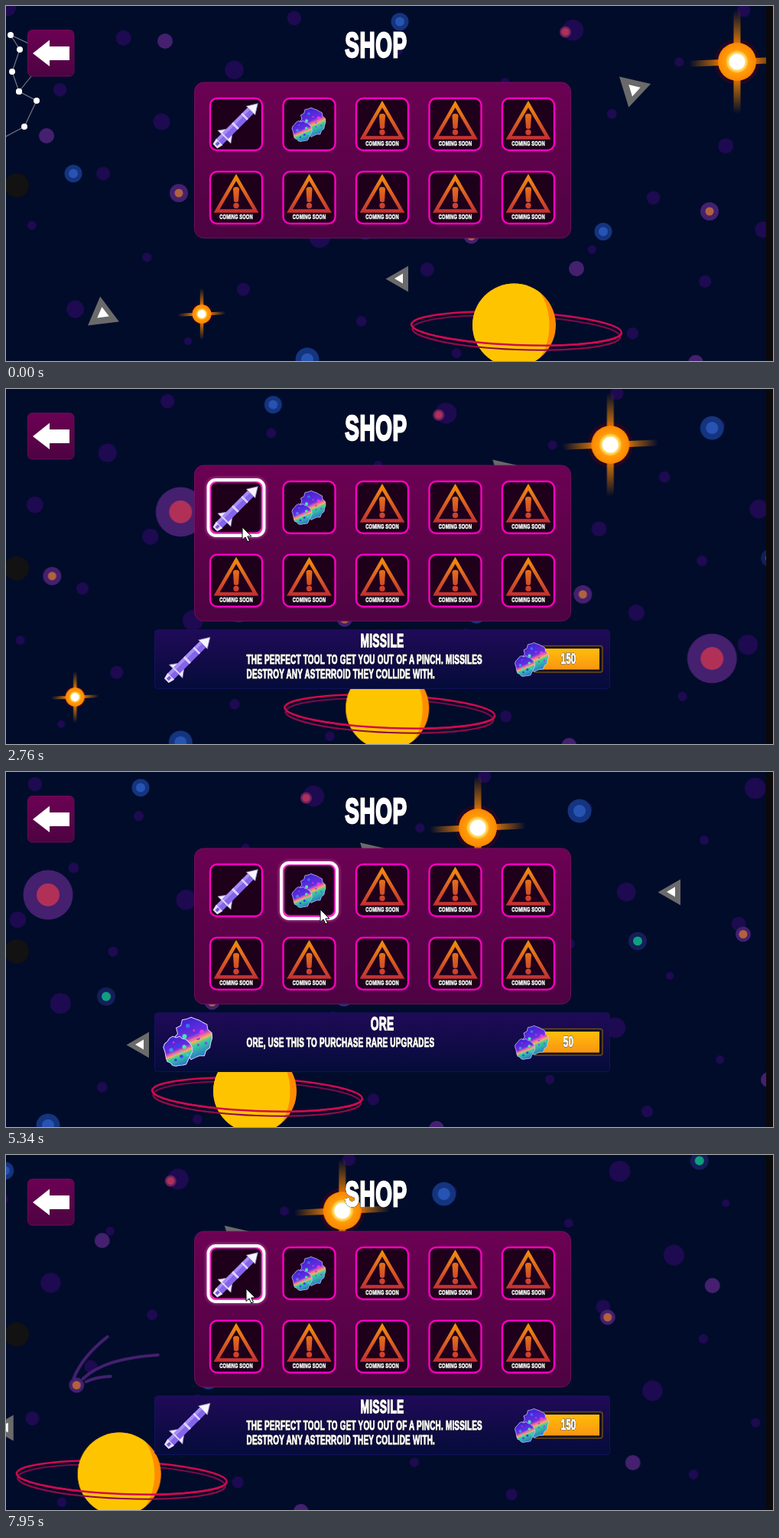
Write an HTML page that moves like this. It is 1003 px wide and 465 px high and loops after 8 s.

```html
<!DOCTYPE html>
<html lang="en">
<head>
<meta charset="utf-8">
<title>Shop</title>
<style>
html, body { margin: 0; width: 100%; height: 100%; overflow: hidden; background: #0b0909; }
svg { display: block; width: 1003px; height: 465px; }
text { font-family: "Liberation Sans", Arial, sans-serif; font-weight: 700; letter-spacing: .02em;
  fill: #fff; stroke: #fff; stroke-width: .06em; filter: drop-shadow(0 0 .7px #000) drop-shadow(0 0 .7px #000); }
#sky { animation: drift 8s infinite; }
#pointer { animation: point 8s linear infinite; }
.missile { animation: missile 8s step-end infinite; }
.ore { animation: ore 8s step-end infinite; }

@keyframes drift {
  0% { transform: translateX(0); animation-timing-function: steps(12); }
  10.25% { transform: translateX(-51.5px); animation-timing-function: steps(17); }
  24.875% { transform: translateX(-115px); animation-timing-function: steps(23); }
  45% { transform: translateX(-221px); animation-timing-function: steps(25); }
  66.75% { transform: translateX(-339px); animation-timing-function: steps(23); }
  86.625% { transform: translateX(-444.5px); animation-timing-function: steps(15); }
  99.375%, 100% { transform: translateX(-516.3px); }
}
@keyframes point {
  0% { transform: translate(372px, 296px); opacity: 0; animation-timing-function: step-end; }
  18% { transform: translate(372px, 296px); opacity: 1; animation-timing-function: ease-out; }
  24%, 41.5% { transform: translate(309px, 181px); opacity: 1; }
  50%, 74% { transform: translate(411px, 180px); opacity: 1; }
  83%, 87.5% { transform: translate(309px, 173px); opacity: 1; }
  92%, 100% { transform: translate(314px, 175px); opacity: 1; }
}
@keyframes missile {
  0% { opacity: 0; } 31.25% { opacity: 1; } 53.75% { opacity: 0; } 91.25%, 100% { opacity: 1; }
}
@keyframes ore {
  0% { opacity: 0; } 53.75% { opacity: 1; } 91.25%, 100% { opacity: 0; }
}
</style>
</head>
<body>
<svg viewBox="0 0 1003 465">
  <defs>
    <linearGradient id="plum" x2="0" y2="1"><stop stop-color="#6c0153"/><stop offset="1" stop-color="#4d0342"/></linearGradient>
    <linearGradient id="indigo" x2="0" y2="1"><stop stop-color="#200a58"/><stop offset="1" stop-color="#040c39"/></linearGradient>
    <linearGradient id="gold" x2="0" y2="1"><stop stop-color="#ffbd0a"/><stop offset="1" stop-color="#f99512"/></linearGradient>
    <linearGradient id="alert" gradientUnits="userSpaceOnUse" x1="0" y1="-30" x2="0" y2="20"><stop stop-color="#f58f0c"/><stop offset="1" stop-color="#c22f33"/></linearGradient>
    <linearGradient id="gem" x1=".3" x2=".7" y2="1">
      <stop stop-color="#3a22d2"/><stop offset=".42" stop-color="#6a2ee0"/><stop offset=".52" stop-color="#e8689c"/>
      <stop offset=".58" stop-color="#f0b45c"/><stop offset=".66" stop-color="#35cfa0"/><stop offset="1" stop-color="#2b62d0"/>
    </linearGradient>
    <linearGradient id="ray"><stop stop-color="#ff8a00" stop-opacity="0"/><stop offset=".3" stop-color="#ff8a00" stop-opacity=".75"/><stop offset=".5" stop-color="#ff9a00"/><stop offset=".7" stop-color="#ff8a00" stop-opacity=".75"/><stop offset="1" stop-color="#ff8a00" stop-opacity="0"/></linearGradient>
    <radialGradient id="sun"><stop offset=".4" stop-color="#fff"/><stop offset=".43" stop-color="#ffe37a"/><stop offset=".54" stop-color="#ffc23a"/><stop offset=".6" stop-color="#ff9d0a"/><stop offset="1" stop-color="#ff8500"/></radialGradient>
    <clipPath id="view"><path d="M0 0h994v465H0z"/></clipPath>
    <clipPath id="disc"><circle cx="664.5" cy="418" r="54.5"/></clipPath>
    <filter id="glow" x="-20%" y="-20%" width="140%" height="140%"><feGaussianBlur stdDeviation="2"/></filter>
    <marker id="node" markerUnits="userSpaceOnUse" markerWidth="8" markerHeight="8" refX="4" refY="4"><circle cx="4" cy="4" r="4" fill="#fff"/></marker>

    <g id="star">
      <circle r="30" fill="#220722"/>
      <path d="M-63 -4h126v8h-126z" fill="url(#ray)" transform="rotate(-2.5)"/>
      <path d="M-68 -4.5h136v9h-136z" fill="url(#ray)" transform="rotate(90)"/>
      <circle r="25" fill="url(#sun)"/>
    </g>
    <g id="shard">
      <path d="M-19.500 0L10 -17V17z" fill="#6a6a6a"/><path d="M-8 -.5L3 -7V6z" fill="#fff"/>
    </g>
    <g id="warn">
      <path d="M0 -26.500L-25.500 17.500H25.500z" fill="none" stroke="url(#alert)" stroke-width="4.500"/>
      <path d="M-4 -11q0 -3 4 -3t4 3l-1 16q-3 2 -6 0z" fill="url(#alert)"/>
      <circle cy="10.500" r="3.700" fill="url(#alert)"/>
    </g>
    <g id="rocket" transform="rotate(45)">
      <path d="M-4 11L-12 22H-4z M4 11L12 22H4z" fill="#efeaff" stroke="#8f86b8" stroke-width=".8"/>
      <path d="M-5.500 -28h11V32h-11z" fill="#8464ea"/>
      <path d="M-5.500 -28h4V32h-4z" fill="#a68cf6"/>
      <path d="M-5.500 -17h11v2.500h-11z M-5.500 0h11v3h-11z M-5.500 20h11v2h-11z" fill="#dcd2ff"/>
      <path d="M0 -40L8 -27H-8z" fill="#f6f4ff" stroke="#8f86b8" stroke-width=".8"/>
      <path d="M-6 31h12l-2 8h-8z" fill="#e9e3ff"/>
      <path d="M-2 32h4v5h-4z" fill="#7a58e0"/>
    </g>
    <g id="rock"></g>
  </defs>

  <path d="M0 0h1003v465H0z" fill="#0b0909"/>
  <g clip-path="url(#view)">
    <path d="M0 0h994v465H0z" fill="#010c2b"/>
    <g id="sky">
      <g id="dots"></g>
      <path d="M605 292Q616 264 649 238M617 293Q645 266 715 262M621 297Q632 291 653 290" fill="none" stroke="#44206f" stroke-width="4" stroke-linecap="round"/>
      <path d="M17 112L57 62L6 38L18 57L8 86L17 112L40 124L24 158L-6 174" fill="none" stroke="#77777f" stroke-width="1.200" marker-start="url(#node)" marker-mid="url(#node)"/>
      <use href="#shard" transform="translate(820 109) rotate(163) scale(1.240)"/>
      <use href="#shard" transform="translate(126 404) rotate(83) scale(1.210)"/>
      <use href="#shard" x="516" y="357.500"/>
      <use href="#shard" x="1211" y="157.500"/>
      <use href="#star" x="956" y="73"/>
      <use href="#star" transform="translate(256 403.500) scale(.5)"/>
      <g fill="none" transform="rotate(2.300 667.500 423)">
        <ellipse cx="667.500" cy="428" rx="136" ry="22" stroke="#7c0a4a" stroke-width="2"/>
        <ellipse cx="667.500" cy="422.500" rx="137.500" ry="21.500" stroke="#d00b4d" stroke-width="2.500"/>
      </g>
      <g clip-path="url(#disc)">
        <path d="M605 360h120v120H605z" fill="#ff8c00"/>
        <ellipse cx="653.500" cy="418" rx="57" ry="70" fill="#ffc400"/>
      </g>
      <g fill="none" transform="rotate(2.300 667.500 423)">
        <path d="M531.500 428a136 22 0 0 0 272 0" stroke="#8c0c48" stroke-width="2"/>
        <path d="M530 422.500a137.500 21.500 0 0 0 275 0" stroke="#d00b4d" stroke-width="2.500"/>
      </g>
    </g>
  </g>
  <circle cx="14" cy="235" r="16" fill="#121212"/>

  <rect x="28.500" y="31.500" width="60.500" height="60.500" rx="6" fill="url(#plum)" stroke="#7a0c5c" stroke-width=".8"/>
  <path d="M35 62L57 44.500V53H83V71H57V79z" fill="#fff"/>
  <rect x="246.500" y="100" width="492" height="204" rx="12" fill="url(#plum)" stroke="#7d1264" stroke-width=".8"/>
  <g id="slots"></g>
  <g id="info"></g>
  <g id="pointer"><path d="M0 0V16.500L4 13L6.800 19L9.500 17.800L6.800 12H12z" fill="#fff" stroke="#000"/></g>
</svg>
<script>
const add = (id, html) => document.getElementById(id).insertAdjacentHTML('beforeend', html);
const times = (n, f) => Array.from({ length: n }, (_, i) => f(i)).join('');
const circle = (x, y, r, fill) => `<circle cx="${x}" cy="${y}" r="${r}" fill="${fill}"/>`;
const use = (id, x, y, k = 1) => `<use href="#${id}" transform="translate(${x} ${y}) scale(${k})"/>`;
const NARROW = 0.6; // one condensed face for all lettering
const label = (s, x, y, size, anchor = 'middle') =>
  `<text transform="translate(${x} ${y}) scale(${NARROW} 1)" font-size="${size}" text-anchor="${anchor}">${s}</text>`;

let seed = 7;
const rand = () => (seed = seed * 16807 % 2147483647) / 2147483647;

// Sky: an even scatter of dim dots, then the bright orbs
add('dots', times(54, i => circle(i * 28 + rand() * 20, i * 0.618 % 1 * 465, 5 + 10 * rand() ** 1.5, '#1d0a50')));

const orbs = (outer, R, inner, r, ...places) =>
  add('dots', places.map(([x, y]) => circle(x, y, R, outer) + circle(x, y, r, inner)).join(''));
const VIOLET = '#44206f', EMBER = '#b2613f', ROSE = '#b03058', BLUE = '#15347f', SKY = '#2754b2';
orbs(VIOLET, 10, VIOLET, 0, [208, 46], [53, 170], [746, 344], [902, 467], [642, 112], [1336, 403], [1440, 171]);
orbs(VIOLET, 12, EMBER, 5.5, [226, 245], [920, 269]);
orbs(VIOLET, 10, EMBER, 5.5, [608.5, 301.5], [1303, 212.5]);
orbs(VIOLET, 32.5, ROSE, 15, [394, 161], [1089, 353]);
orbs(BLUE, 11.5, SKY, 6, [515, 20.5], [88, 219.5], [781, 295.5]);
orbs(BLUE, 15.5, SKY, 8, [394, 463], [1089, 51]);
orbs('#141f58', 12, '#0f9f80', 6, [470, 294], [1165, 221.5], [1423, 7.5]);
orbs('#66225f', 7.5, ROSE, 5, [731.5, 34]);

// Ore: two ragged lumps with a bright seam and random flecks
const lump = (x, y, rx, ry) => {
  const points = times(26, i => {
    const a = i / 26 * 2 * Math.PI, k = 0.88 + 0.2 * rand();
    return `${x + rx * k * Math.cos(a)},${y + ry * k * Math.sin(a)} `;
  });
  const flecks = times(9, i => {
    const a = i * 2.4, d = 0.25 + 0.06 * i;
    return circle(x + rx * d * Math.cos(a), y + ry * d * Math.sin(a), 0.8 + 1.4 * rand(), `hsl(${150 + 170 * rand()} 85% 58%)`);
  });
  return `<polygon points="${points}" fill="url(#gem)" stroke="#d9d2ff" stroke-width=".7"/>${flecks}
    <path d="M${x - rx * .6} ${y + ry * .3}L${x + rx * .7} ${y - ry * .2}" stroke="#f4709a" stroke-width="1.500"/>`;
};
add('rock', lump(4.5, -3.5, 16.5, 18.5) + lump(-9.5, 8.5, 12.5, 13.5));

// Shop grid
const frame = (x, look) => `<rect x="${x - 36.5}" y="119" width="73" height="73" rx="10" ${look}/>`;
const ring = (cls, x) => `<g class="${cls}" fill="none">
  ${frame(x, 'stroke="#ff9be6" stroke-width="5" opacity=".6" filter="url(#glow)"')}
  ${frame(x, 'stroke="#fff" stroke-width="3.800"')}</g>`;
const icon = (i, x, y) => i === 0 ? use('rocket', x, y + 1) : i === 1 ? use('rock', x, y + .5)
  : use('warn', x, y) + label('COMING SOON', x, y + 28.3, 9.6);

add('slots', label('SHOP', 484, 66.5, 46.5));
add('slots', times(10, i => {
  const x = 301 + i % 5 * 95.5, y = i < 5 ? 155 : 251;
  return `<rect x="${x - 34}" y="${y - 34}" width="68" height="68" rx="9" fill="#1e001b" stroke="#ff00c1" stroke-width="2.400"/>` + icon(i, x, y);
}));
add('slots', ring('missile', 301) + ring('ore', 396.5));

// Details of the chosen item
const card = (cls, picture, name, lines, price) => add('info', `<g class="${cls}">
  <rect x="194.500" y="315.500" width="595" height="77" rx="4" fill="url(#indigo)" stroke="#12125c"/>
  ${picture}${label(name, 492, 337.5, 23)}
  ${lines.map((s, i) => label(s, 314.5, 359.7 + 19 * i, 16.6, 'start')).join('')}
  <rect x="690" y="336.500" width="90" height="34.500" rx="3" fill="#17101c" stroke="#6a4c14" stroke-width="1.500"/>
  <rect x="693" y="340" width="83" height="27.500" fill="url(#gold)"/>
  ${use('rock', 688, 354.5)}${label(price, 735.5, 360, 19.5)}</g>`);

card('missile', use('rocket', 238, 354, 1.02), 'MISSILE',
  ['THE PERFECT TOOL TO GET YOU OUT OF A PINCH. MISSILES', 'DESTROY ANY ASTERROID THEY COLLIDE WITH.'], 150);
card('ore', use('rock', 238.5, 353.5, 1.45), 'ORE', ['ORE, USE THIS TO PURCHASE RARE UPGRADES'], 50);
</script>
</body>
</html>
```
